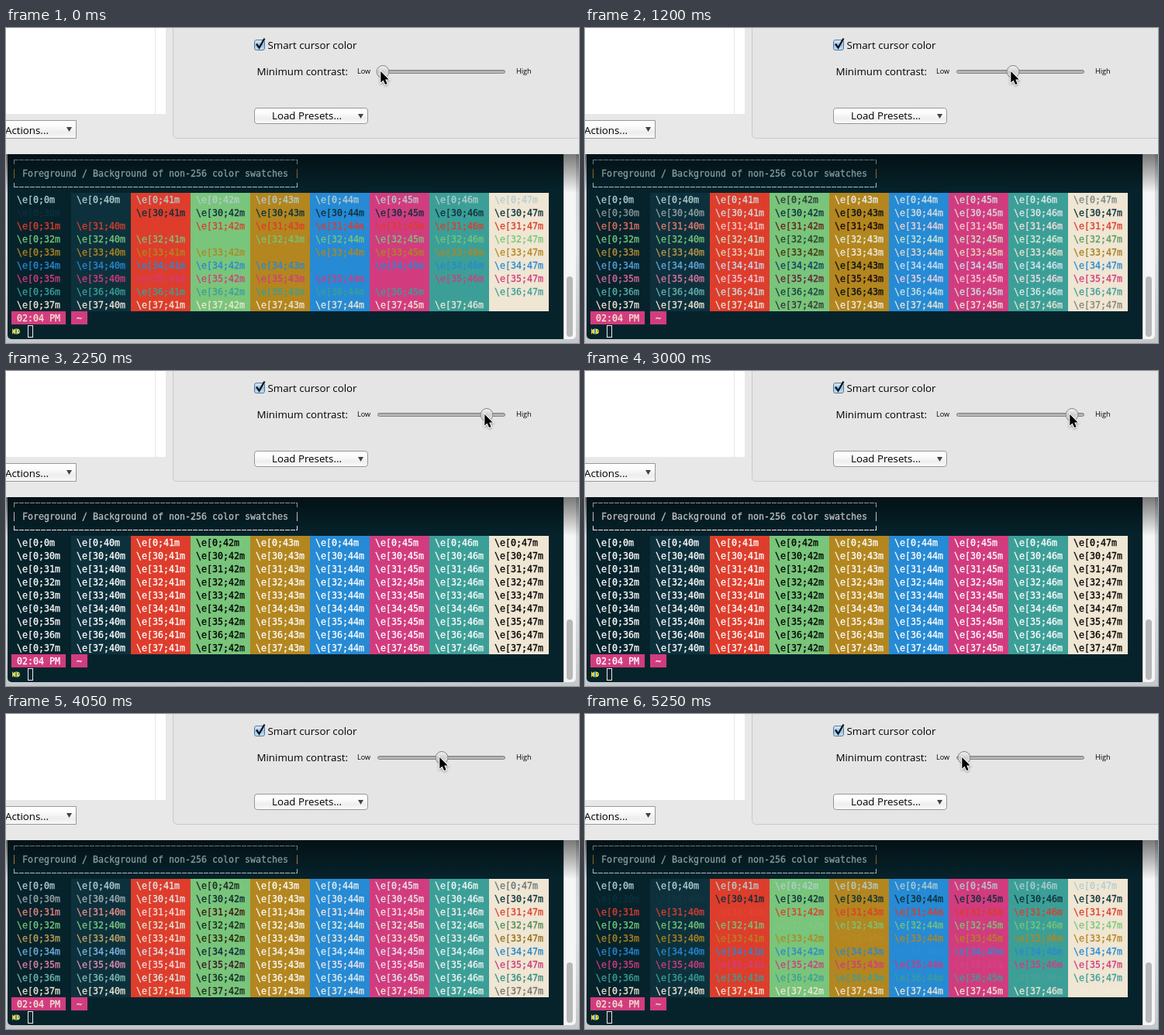
An HTML page with a canvas that plays this animation: 739 by 407 pixels, repeating every 5400 ms.

```html
<!DOCTYPE html>
<html lang="en">
<head>
<meta charset="utf-8">
<title>Minimum contrast</title>
<style>
  html, body { margin: 0; width: 100%; height: 100%; overflow: hidden; background: #e7e7e7; }
  canvas { display: block; }
</style>
</head>
<body>
<canvas id="stage" width="739" height="407"></canvas>
<script>
const ctx = document.getElementById('stage').getContext('2d');
const LOOP = 5400, STEP = 150;
const CELL = 7, LINE = 17, TOP = 213;
const MONO = '11.63px "DejaVu Sans Mono", "Liberation Mono", monospace';
const UI = '"Open Sans", "Noto Sans", sans-serif';

// Slider position over time: [ms, x]
const PATH = [[0, 486], [1200, 552], [2250, 620], [2550, 634], [2700, 636], [2850, 634],
  [3000, 628], [3450, 600], [4050, 562], [4650, 522], [5250, 489], [5400, 486]];

const BACK = '#06232c', TEXT = '#b3cdd0';
const ANSI = ['#0d313c', '#de3d2c', '#79c57b', '#b3861f', '#268ad4', '#d23c7f', '#3c9f97', '#efe6d3'];

// Contrast is worked out in a gamma 1.8 space and shown in gamma 2.2
const GAMMA = 2.2 / 1.8;
const decode = hex => [1, 3, 5].map(i => (parseInt(hex.substr(i, 2), 16) / 255) ** GAMMA);
const encode = rgb => `rgb(${rgb.map(v => Math.round(255 * v ** (1 / GAMMA))).join()})`;
const luma = ([r, g, b]) => 0.3 * r + 0.59 * g + 0.11 * b;

function contrast(fg, bg, min) {
  const main = decode(fg), a = luma(main), b = luma(decode(bg));
  if (Math.abs(a - b) >= min) return fg;
  let goal;
  if (a < b) {
    goal = b - min;
    const alt = b + min;
    if (goal < 0 && Math.min(alt, 1) - b > b) goal = alt;
  } else {
    goal = b + min;
    const alt = b - min;
    if (goal > 1 && b - Math.max(alt, 0) > 1 - b) goal = alt;
  }
  goal = Math.min(1, Math.max(0, goal));
  const end = goal > a ? 1 : 0;
  const p = (goal - a) / (end - a || 1);
  return encode(main.map(v => v + p * (end - v)));
}

function sliderAt(t) {
  const i = PATH.findIndex(p => p[0] > t);
  const [t0, x0] = PATH[i - 1], [t1, x1] = PATH[i];
  return x0 + (x1 - x0) * (t - t0) / (t1 - t0);
}

function rect(x, y, w, h, fill) {
  ctx.fillStyle = fill;
  ctx.fillRect(x, y, w, h);
}

function round(x, y, w, h, r, fill, stroke) {
  ctx.beginPath();
  ctx.roundRect(x, y, w, h, r);
  if (fill) { ctx.fillStyle = fill; ctx.fill(); }
  if (stroke) { ctx.strokeStyle = stroke; ctx.lineWidth = 1; ctx.stroke(); }
}

function poly(points, fill) {
  ctx.beginPath();
  points.forEach(([x, y]) => ctx.lineTo(x, y));
  ctx.closePath();
  ctx.fillStyle = fill;
  ctx.fill();
}

function fade(y0, y1, ...colors) {
  const g = ctx.createLinearGradient(0, y0, 0, y1);
  colors.forEach((c, i) => g.addColorStop(i / (colors.length - 1), c));
  return g;
}

function label(text, x, y, size = 13.3) {
  ctx.font = `${size}px ${UI}`;
  ctx.fillStyle = '#000';
  ctx.fillText(text, x, y);
}

function mono(text, x, y, color) {
  ctx.font = MONO;
  ctx.fillStyle = ctx.strokeStyle = color;
  ctx.lineWidth = 0.3;
  ctx.fillText(text, x, y);
  ctx.strokeText(text, x, y);
}

const arrow = (x, y) => poly([[x, y], [x + 7, y], [x + 3.5, y + 6]], '#3d4450');

function pointer(x, y) {
  ctx.save();
  ctx.translate(x, y);
  ctx.beginPath();
  [[0, 0], [0, 14.5], [3.3, 11.5], [5.8, 17], [8.3, 16], [5.9, 10.6], [10.4, 10.4]]
    .forEach(([px, py]) => ctx.lineTo(px, py));
  ctx.closePath();
  ctx.shadowColor = 'rgba(0,0,0,.4)';
  ctx.shadowBlur = 3;
  ctx.shadowOffsetY = 1;
  ctx.strokeStyle = '#fff';
  ctx.lineWidth = 2;
  ctx.stroke();
  ctx.shadowColor = 'transparent';
  ctx.fillStyle = '#000';
  ctx.fill();
  ctx.restore();
}

function settings(x) {
  rect(0, 0, 739, 163, '#e8e8e8');
  rect(0, 0, 206, 111, '#fff');
  rect(192, 0, 1, 111, '#e6e6e6');
  round(215.5, -10, 540, 152.5, 5, '#e5e5e5', '#c9c9c9');

  round(-9.5, 119.5, 100, 23, 0, fade(119, 143, '#fff', '#fbfbfb', '#ededed', '#fafafa'), '#989898');
  label('Actions...', -1, 137);
  arrow(78, 128);

  round(320.5, 15.5, 13, 13, 2.5, fade(15, 29, '#eaf4fd', '#8fc0ea', '#c9ecff'), '#5d7591');
  ctx.beginPath();
  ctx.moveTo(323, 20.5);
  ctx.lineTo(326.5, 25.5);
  ctx.lineTo(333.5, 13.5);
  ctx.strokeStyle = '#10151c';
  ctx.lineWidth = 2.3;
  ctx.stroke();
  label('Smart cursor color', 337.5, 27);

  label('Minimum contrast:', 323.5, 61);
  label('Low', 453, 59, 9.1);
  label('High', 658, 59, 9.1);

  round(320.5, 103.5, 146, 20, 3.5, fade(103, 124, '#fff', '#fcfcfc', '#eeeeee', '#fdfdfd'), '#979797');
  label('Load Presets...', 343, 118);
  arrow(454, 111);

  round(479.5, 54.5, 164, 4, 2, fade(54, 59, '#969696', '#d2d2d2'), '#808080');
  round(x - 8, 48.5, 16, 16, 8, fade(48, 65, '#f6f6f6', '#d2d2d2', '#f0f0f0'), '#848484');
  pointer(x - 2.7, 56);
}

function titleBox(min) {
  const text = contrast(TEXT, BACK, min), edge = contrast(ANSI[3], BACK, min);
  ctx.strokeStyle = text;
  ctx.lineWidth = 1;
  ctx.setLineDash([6, 1]);
  for (const y of [170.5, 205.5]) {
    ctx.beginPath();
    ctx.moveTo(10, y);
    ctx.lineTo(376, y);
    ctx.stroke();
  }
  ctx.setLineDash([]);
  for (const x of [10, 375]) {
    rect(x, 170, 1, 6, text);
    rect(x, 200, 1, 6, text);
    rect(x, 182, 1, 12, edge);
  }
  mono('Foreground / Background of non-256 color swatches', 21, 192, text);
}

function swatches(min) {
  for (let col = 0; col < 9; col++) {
    const x = CELL + col * 11 * CELL;
    const bg = col ? ANSI[col - 1] : BACK;
    rect(x, TOP, 11 * CELL, 9 * LINE, bg);
    for (let row = 0; row < 9; row++) {
      const fg = row ? ANSI[row - 1] : TEXT;
      const a = row ? 29 + row : 0, b = col ? 39 + col : 0;
      const code = col ? `${a};${b}` : `0;${a}`;
      const color = contrast(fg, bg, min);
      if (color !== bg) mono(`\\e[${code}m`, x + CELL, TOP + row * LINE + 13, color);
    }
  }
}

function fish() {
  poly([[8, 388], [11, 392], [8, 396]], '#d9c53a');
  ctx.beginPath();
  ctx.ellipse(13.5, 392, 4.5, 3.6, 0, 0, 7);
  ctx.fillStyle = '#e6d34a';
  ctx.fill();
  rect(12, 389, 2, 6, '#3c9fc0');
  rect(16, 391, 1, 1, '#122');
}

function prompt(min) {
  const pink = ANSI[5], color = contrast(ANSI[7], pink, min);
  rect(7, 366, 70, LINE, pink);
  rect(84, 366, 21, LINE, pink);
  mono('02:04 PM', 14, 379, color);
  mono('~', 91, 379, color);
  fish();
  ctx.strokeStyle = '#e8eeee';
  ctx.lineWidth = 1;
  ctx.strokeRect(28.5, 384.5, 6, 15);
}

function terminal(min) {
  rect(0, 163, 739, 244, fade(163, 407, '#cfd3d6', '#dcdfe1', '#c3c7ca'));
  round(2, 158, 733, 244, 5, '#f5f5f5');
  round(2, 158, 717, 244, [0, 0, 0, 5], BACK);
  rect(719, 163, 1, 239, '#dadada');
  round(723, 321, 8, 78, 4, '#b8b8b8');
  titleBox(min);
  swatches(min);
  prompt(min);
  rect(0, 163, 739, 50, fade(163, 213, 'rgba(0,0,0,.5)', 'rgba(0,0,0,.26)', 'rgba(0,0,0,0)'));
}

function draw(t) {
  const x = sliderAt(t);
  const min = Math.min(1, Math.max(0, (x - 486) / 148));
  terminal(min);
  settings(x);
}

const start = performance.now();
let last = -1;
function tick() {
  const t = Math.max(0, performance.now() - start) % LOOP;
  const beat = Math.floor(t / STEP);
  if (beat !== last) draw(beat * STEP);
  last = beat;
  requestAnimationFrame(tick);
}
tick();
</script>
</body>
</html>
```
